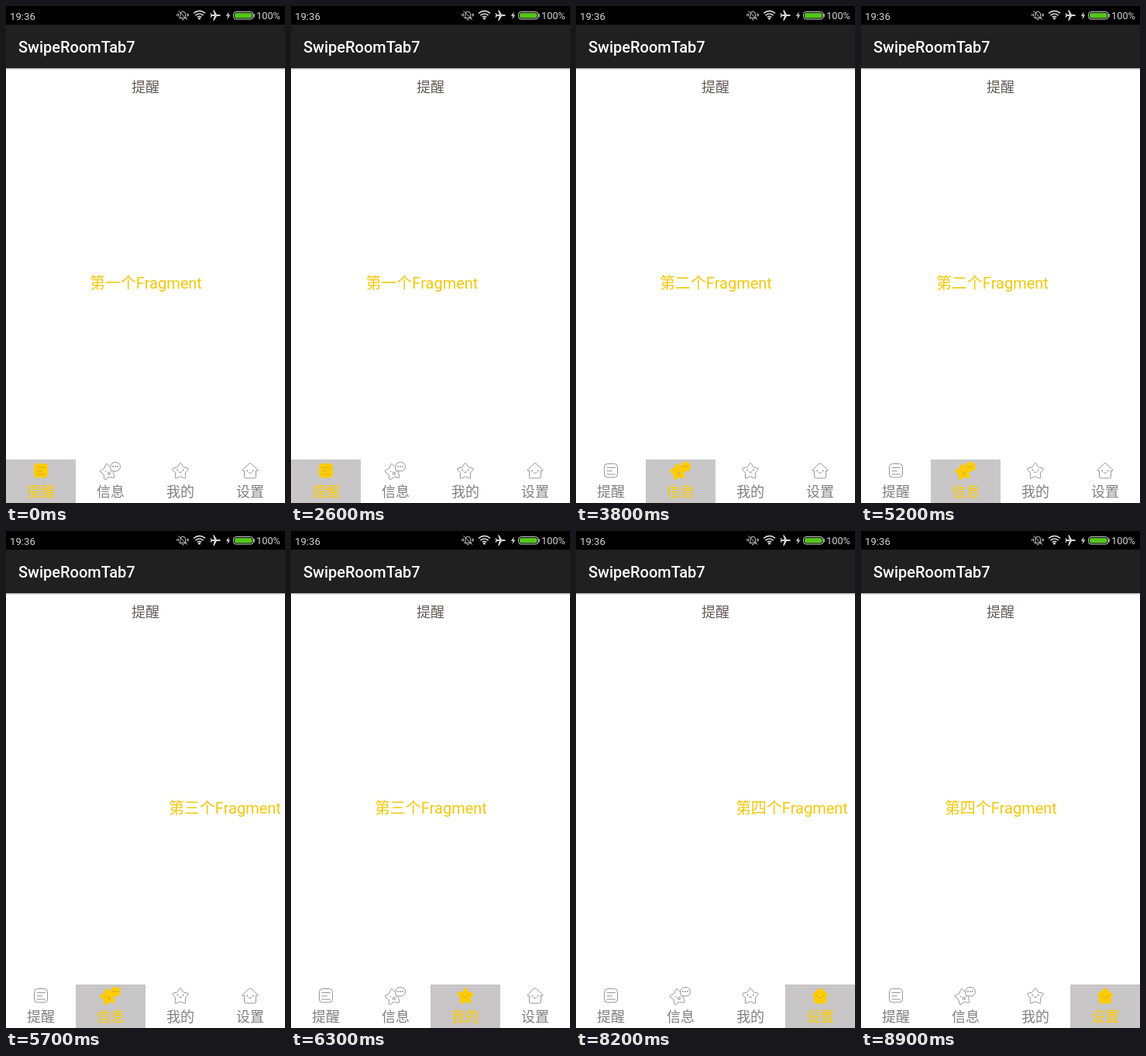
These frames come from a looping animation (360x640 px, 9.5 s). An HTML page:

```html
<!DOCTYPE html>
<html lang="zh-CN">
<head>
<meta charset="utf-8">
<title>Swipe tabs</title>
<style>
html, body { margin: 0; width: 100%; height: 100%; overflow: hidden; background: #fff; }
svg { display: block; width: 100vw; height: 100vh; }
text { font-family: Roboto, "Noto Sans CJK SC", "Noto Sans CJK", sans-serif; }
.page text { font-size: 20px; fill: #f2c80f; text-anchor: middle; }
.mid { font-size: 18px; text-anchor: middle; }
.tab { color: #8a8a8a; }
.tab .mid { fill: #808080; }
.tab .bg { fill: none; }
.tab .body { fill: #fff; stroke: currentColor; stroke-width: .9; }
.tab .line { fill: none; stroke: currentColor; stroke-width: .9; stroke-linecap: round; }
.tab .dot { fill: currentColor; }
.tab.on { color: #fc0; }
.on .mid { fill: currentColor; }
.on .bg { fill: #c8c6c6; }
.on .body { fill: currentColor; }
.on .line { stroke: #cfab36; }
.on .dot { fill: #cfab36; }
</style>
</head>
<body>
<svg viewBox="0 0 360 640" preserveAspectRatio="none">
  <defs>
    <linearGradient id="shade" x2="0" y2="1">
      <stop stop-color="#aaa"/><stop offset="1" stop-color="#fff"/>
    </linearGradient>
  </defs>
  <rect width="360" height="640" fill="#fff"/>
  <rect y="80" width="360" height="2.5" fill="url(#shade)"/>
  <rect y="24" width="360" height="56" fill="#202020"/>
  <rect width="360" height="24"/>

  <g fill="#d4d4d4">
    <text x="5" y="17.5" font-size="13.2">19:36</text>
    <text x="323" y="17" font-size="12.8">100%</text>
    <path transform="rotate(90 270.5 12)" d="M270.5 5.5q1.1 0 1.1 2v3l5.6 3.4v1.5l-5.6-1.7v3l1.6 1.2v1l-2.7-.7-2.7.7v-1l1.6-1.2v-3l-5.6 1.7v-1.5l5.6-3.4v-3q0-2 1.1-2z"/>
    <path d="M287.8 7.5l-4 5.3h2.5l-1 4.4 4.1-5.7h-2.5z"/>
    <circle cx="249.5" cy="16" r="1.6"/>
  </g>
  <g fill="none" stroke="#d4d4d4" stroke-width="1.6">
    <path d="M242 9.3q7.5-5.8 15 0M244.4 12q5.1-3.9 10.2 0M246.8 14.3q2.7-2 5.4 0"/>
    <path stroke-width="1" d="M224 15.5h8.5l-1-2v-3.2q-.4-3-3.3-3.2-3 .2-3.3 3.2v3.2zM226.8 17.6h2.8M222.6 6.2l11.2 11.4M222.4 9.5v4M220.7 10.3v2.4M234 9.5v4M235.4 10.3v2.4"/>
  </g>
  <rect x="293.5" y="7.5" width="25.5" height="9.5" rx="3.4" fill="none" stroke="#d4d4d4"/>
  <rect x="295" y="9" width="22.5" height="6.5" rx="2" fill="#55c41c"/>
  <rect x="319.3" y="10" width="1.4" height="4.4" rx=".6" fill="#d4d4d4"/>

  <text x="16" y="60" font-size="20" font-weight="500" fill="#fff">SwipeRoomTab7</text>
  <text class="mid" x="180" y="111" fill="#625a56">提醒</text>
  <g class="page" id="pages"></g>
  <g id="tabs"></g>
</svg>
<script>
const LOOP = 9500, TICK = 100, W = 360;

// Each swipe: start time, tick at which the tab switches, scroll per tick
const SWIPES = [
  { at: 2600, pick: 7, x: [11.5, 30, 51, 75, 99, 120, 136, 270, 330, 353, 358, 359.4, 360] },
  { at: 5200, pick: 6, x: [11, 36, 80, 140, 204, 258, 304, 335, 350, 357, 359, 360] },
  { at: 7800, pick: 4, x: [11, 48, 108, 186, 262, 314, 340, 352, 357, 359, 359.6, 360] }
];

// Five-pointed star with softened tips
function star(cx, cy, R, r, turn = 0) {
  const pt = (i, k) => {
    const a = (i * 36 - 90 + turn) * Math.PI / 180;
    return [cx + k * Math.cos(a), cy + k * Math.sin(a)];
  };
  const mix = (p, q, t) => p.map((v, i) => (v + (q[i] - v) * t).toFixed(2));
  let d = '';
  for (let i = 0; i < 10; i += 2) {
    const tip = pt(i, R), before = pt(i - 1, r), after = pt(i + 1, r);
    d += `${i ? 'L' : 'M'}${mix(before, tip, .08)}L${mix(before, tip, .68)}Q${tip.map(v => v.toFixed(2))} ${mix(tip, after, .32)}L${mix(tip, after, .92)}`;
  }
  return d + 'Z';
}

const body = d => `<path class="body" d="${d}"/>`;
const line = d => `<path class="line" d="${d}"/>`;
const dot = (x, y, r = .9) => `<circle class="dot" cx="${x}" cy="${y}" r="${r}"/>`;
const face = y => dot(41.3, y) + dot(48.7, y) + line(`M43 ${y + 2.4}q2 1.8 4 0`);

const ICONS = [
  '<rect class="body" x="36.5" y="589.5" width="17" height="17.5" rx="4"/>' +
    line('M40 594.5h10.5M40 598.8h6.5M40 603h10.5'),
  body(star(41.8, 600, 11.8, 6.6, -12)) + dot(38.5, 599.5, .8) +
    '<ellipse class="line" cx="42.8" cy="602" rx="1.4" ry="1.9"/>' +
    body('M46 598.3q-1.5-2-1.3-5 .6-5.6 6.4-5.8 6.2.2 6.4 5.8-.2 5.6-6.4 5.8-2 0-3-.6l-2.6.8z') +
    dot(48, 593) + dot(51, 593) + dot(54, 593),
  body(star(45, 599.3, 12, 6.6)) + face(597.5),
  body('M37.5 598.5h-2.2q-1-.3-.2-1.2l8.6-8q1.3-1 2.6 0l8.6 8q.8.9-.2 1.2h-2.2v7.5q0 2-2 2h-11q-2 0-2-2z') + face(598.5)
];

const pages = document.getElementById('pages');
const tabs = document.getElementById('tabs');
pages.innerHTML = [...'一二三四'].map((n, i) =>
  `<text x="${180.4 + i * W}" y="363.5">第${n}个Fragment</text>`).join('');
tabs.innerHTML = ['提醒', '信息', '我的', '设置'].map((name, i) =>
  `<g class="tab" transform="translate(${i * 90})"><rect class="bg" y="584" width="90" height="56"/>${ICONS[i]}<text class="mid" x="45" y="632.3">${name}</text></g>`).join('');

function draw(now) {
  const t = now % LOOP;
  let scroll = 0, active = 0;
  for (const s of SWIPES) {
    const tick = Math.floor((t - s.at) / TICK);
    if (tick < 0) break;
    scroll += s.x[Math.min(tick, s.x.length - 1)];
    if (tick >= s.pick) active++;
  }
  pages.setAttribute('transform', `translate(${-scroll})`);
  [...tabs.children].forEach((tab, i) => tab.classList.toggle('on', i === active));
}

const start = performance.now();
function frame() {
  draw(performance.now() - start);
  requestAnimationFrame(frame);
}
frame();
</script>
</body>
</html>
```
